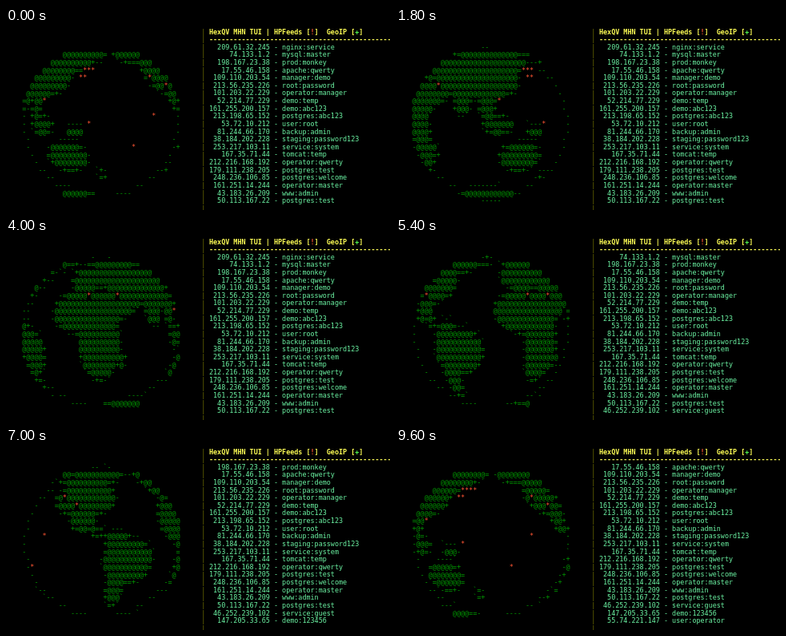
Animation of 480x228 px, one loop 9.8 s. Source, as an HTML page:

```html
<!DOCTYPE html>
<html lang="en">
<head>
<meta charset="utf-8">
<title>Honeypot globe</title>
<style>
  html, body { margin: 0; width: 100%; height: 100%; overflow: hidden; background: #000; }
  #stage { position: relative; width: 480px; height: 228px; overflow: hidden; background: #000; }
  pre {
    position: absolute; top: .5px; left: 0; margin: 0;
    font: 8.42px/9.62px "DejaVu Sans Mono", monospace;
    font-variant-ligatures: none;
  }
  #land { color: #009a00; }
  #hits, .hit { color: #ff5533; }
  #rule { left: 244.3px; color: #707000; }
  #head { left: 254px; color: #ffff55; font-weight: bold; }
  #log { left: 254px; top: 19.74px; color: #6cf5a4; }
  .geo { color: #55ff55; }
</style>
</head>
<body>
<div id="stage">
  <pre id="land"></pre>
  <pre id="hits"></pre>
  <pre id="rule"></pre>
  <pre id="head">HexQV MHN TUI | HPFeeds [<span class="hit">!</span>]  GeoIP [<span class="geo">+</span>]
----------------------------------------------</pre>
  <pre id="log"></pre>
</div>
<script>
const STEP = 200, STEPS = 49;
const COLS = 47, ROWS = 23, CX = 23, CY = 12, RX = 20, RY = 10.1;
const START = 171, TURN = 7.2, SPREAD = 1.25;
const SHADES = " `--++==@@";
const SCROLLS = [24, 30, 46];
const RAD = Math.PI / 180;

const events = `209.61.32.245 nginx:service
74.133.1.2 mysql:master
198.167.23.38 prod:monkey
17.55.46.158 apache:qwerty
109.110.203.54 manager:demo
213.56.235.226 root:password
101.203.22.229 operator:manager
52.214.77.229 demo:temp
161.255.200.157 demo:abc123
213.198.65.152 postgres:abc123
53.72.10.212 user:root
81.244.66.170 backup:admin
38.184.202.228 staging:password123
253.217.103.11 service:system
167.35.71.44 tomcat:temp
212.216.168.192 operator:qwerty
179.111.238.205 postgres:test
248.236.106.85 postgres:welcome
161.251.14.244 operator:master
43.183.26.209 www:admin
50.113.167.22 postgres:test
46.252.239.102 service:guest
147.205.33.65 demo:123456
55.74.221.147 user:operator`.split("\n").map(line => {
  const [ip, login] = line.split(" ");
  return ip.padStart(15) + " - " + login;
});

const wrap = a => ((a + 180) % 360 + 360) % 360 - 180;

// Each continent is a few overlapping ovals: centre and half size in degrees
const ovals = [];
const oval = (lon, lat, w, h) => ovals.push({ lon, lat, w, h });

// Africa
oval(14, 18, 35, 19);
oval(26, -10, 19, 27);
oval(47, -20, 4, 6);
// Europe and Asia
oval(10, 47, 22, 12);
oval(75, 54, 85, 20);
oval(158, 62, 24, 8);
oval(95, 35, 43, 17);
oval(48, 27, 17, 14);
oval(79, 18, 9, 12);
oval(102, 14, 8, 10);
// Islands and Australia
oval(112, -1, 14, 7);
oval(147, -5, 8, 5);
oval(136, -25, 23, 12);
oval(172, -41, 5, 5);
// The Americas and Greenland
oval(-107, 61, 60, 13);
oval(-100, 38, 36, 17);
oval(-98, 17, 13, 8);
oval(-84, 9, 6, 4);
oval(-66, 2, 12, 8);
oval(-55, -13, 25, 18);
oval(-67, -36, 10, 19);
oval(-40, 72, 20, 12);
// Antarctic coast
oval(95, -65, 65, 10);

const isLand = (lon, lat) => ovals.some(o =>
  Math.hypot(wrap(lon - o.lon) / o.w, (lat - o.lat) / o.h) < 1);

const clamp = v => Math.max(-1, Math.min(1, v));

function landAt(dx, dy, centre) {
  const y = clamp(dy / RY);
  const x = clamp(dx / RX / Math.sqrt(1 - y * y + 1e-9));
  return isLand(centre + SPREAD * Math.asin(x) / RAD, -Math.asin(y) / RAD);
}

// The character shows how much of its cell is land; open sea gets a thin rim
function cell(col, row, centre) {
  const dx = col - CX, dy = row - CY;
  const r = Math.hypot(dx / RX, dy / RY);
  if (r >= 1) return " ";
  let n = 0;
  for (let i = -1; i <= 1; i++)
    for (let j = -1; j <= 1; j++)
      n += landAt(dx + i / 3, dy + j / 3, centre);
  return n === 0 && r > .91 && r < .96 ? "-" : SHADES[n];
}

// Attack origins: runs of n markers going east
const hits = [];
const hit = (lon, lat, n = 1) => {
  for (let i = 0; i < n; i++) hits.push({ lon: lon + 4.5 * i, lat });
};
hit(150, 44, 4);
hit(147, 36.5, 2);
hit(234, 36.5);
hit(254, 30);
hit(224, 6);
hit(159, 0);
hit(203, -17);
hit(112, 17);
hit(16, 30);
hit(43, 30);

const grid = fill => Array.from({ length: ROWS }, (_, row) =>
  Array.from({ length: COLS }, (_, col) => fill(col, row)));
const show = (id, rows) => {
  document.getElementById(id).textContent = rows.join("\n");
};
const text = g => g.map(row => row.join(""));

function draw(step) {
  const centre = START - TURN * step;
  const globe = grid((col, row) => cell(col, row, centre));
  const marks = grid(() => " ");
  for (const { lon, lat } of hits) {
    const a = wrap(lon - centre) / SPREAD;
    if (Math.abs(a) > 72) continue;
    const col = Math.round(CX + RX * Math.cos(lat * RAD) * Math.sin(a * RAD));
    const row = Math.round(CY - RY * Math.sin(lat * RAD));
    marks[row][col] = "*";
    globe[row][col] = " ";
  }
  show("land", text(globe));
  show("hits", text(marks));
  const first = SCROLLS.filter(s => step >= s).length;
  show("log", events.slice(first, first + 21));
}

show("rule", Array(24).fill("|"));

let last = -1;
function tick() {
  const step = Math.floor(performance.now() / STEP) % STEPS;
  if (step !== last) draw(last = step);
  requestAnimationFrame(tick);
}
tick();
</script>
</body>
</html>
```
